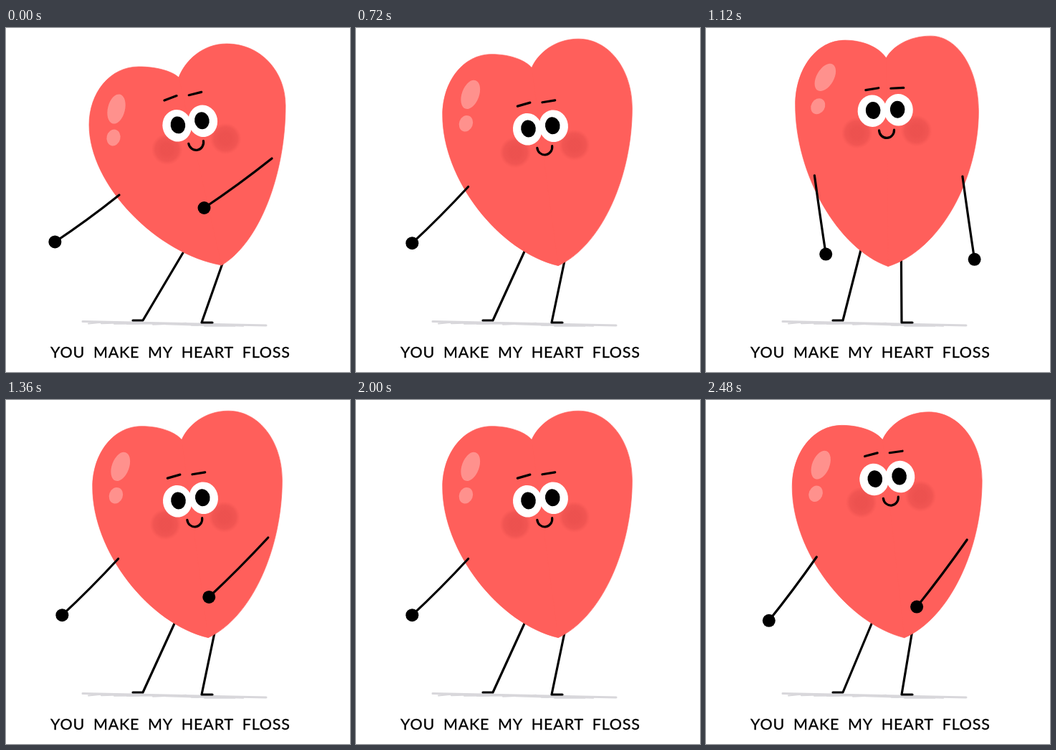
Recreate the animation shown at these times as an HTML page with a canvas. Size 480 by 480 pixels, loop 2560 ms.

```html
<!DOCTYPE html>
<html lang="en">
<head>
<meta charset="utf-8">
<title>You make my heart floss</title>
<style>
  html, body { margin: 0; width: 100%; height: 100%; overflow: hidden; background: #fff; }
  canvas { display: block; width: 480px; height: 480px; }
</style>
</head>
<body>
<canvas id="stage" width="480" height="480"></canvas>
<script>
const ctx = document.getElementById('stage').getContext('2d');
const STEP = 80, STEPS = 32, BEAT = 8;
const INK = '#000', RED = '#ff5f5b', SHINE = '#ff918d', SHADOW = '#d8d7db';

// lean runs from 1 (hands left) to -1 (hands right); rise peaks between the two
function motionAt(phase) {
  const turn = 2 * Math.PI * phase / BEAT;
  const inertia = Math.sin(turn);
  const lean = Math.abs(phase - BEAT / 2) / 2 - 1 + 0.09 * inertia;
  return { lean, inertia, rise: inertia ** 2, bounce: Math.sin(2 * turn) };
}

const place = ({ lean, rise }, rest, sway, lift = [0, 0]) =>
  rest.map((v, i) => v + sway[i] * lean + lift[i] * rise);

function line(points, width = 3.2, color = INK) {
  ctx.beginPath();
  points.forEach(([x, y]) => ctx.lineTo(x, y));
  ctx.lineWidth = width;
  ctx.strokeStyle = color;
  ctx.stroke();
}

function oval(x, y, rx, ry, color, angle = 0) {
  ctx.beginPath();
  ctx.ellipse(x, y, rx, ry, angle, 0, 7);
  ctx.fillStyle = color;
  ctx.fill();
}

function seededRandom(seed) {
  return () => (seed = seed * 16807 % 2147483647) / 2147483647;
}

function drawShadow() {
  const random = seededRandom(7);
  const ground = x => 409.5 + 0.021 * (x - 107);
  line([[107, ground(107)], [363, ground(363)]], 3, SHADOW);
  for (let x = 115; x < 310; x += 18) {
    const end = x + 25 + 30 * random();
    line([[x, ground(x) + 3 * random()], [end, ground(end) + 3 * random() - 1]], 2, SHADOW);
  }
}

function drawLegs(tipX) {
  const shift = tipX - 215;
  line([[tipX - 27 - 0.22 * shift, 300], [191, 408], [177, 408]]);
  line([[tipX + 24 - 0.15 * shift, 300], [273, 411], [288, 411]]);
}

// Half of the heart, from the notch over the lobe to the tip; dir is 1 for the right half
function addHalf(notch, top, side, tip, dir, lean) {
  const [nx, ny] = notch, [tx, ty] = top, [sx, sy] = side;
  const u = dir * lean;
  ctx.moveTo(nx, ny);
  ctx.bezierCurveTo(nx + 0.13 * (tx - nx), (ny + ty) / 2, (nx + tx) / 2, ty, tx, ty);
  ctx.bezierCurveTo(tx + 0.58 * (sx - tx), ty, sx, sy - 0.55 * (sy - ty), sx, sy);
  ctx.bezierCurveTo(sx, sy + 0.43 * (tip[1] - sy),
    tip[0] + dir * (72 - 19 * u), tip[1] - 24 - 8 * u, ...tip);
  ctx.lineTo(nx, ny);
}

function drawHeart(m, tip) {
  const notch = place(m, [250.5, 69], [-9.5, 0], [0, -27]);
  const topL = place(m, [187.5, 44], [-2.5, 10], [6, -26]);
  const topR = place(m, [313, 34.5], [-5, -12.5], [0, -24.5]);
  const sideL = place(m, [112, 132.5], [4, 2.5], [13, -25]);
  const sideR = place(m, [388.5, 110], [1.5, -2], [-8, 6]);
  ctx.beginPath();
  addHalf(notch, topL, sideL, tip, -1, m.lean);
  addHalf(notch, topR, sideR, tip, 1, m.lean);
  ctx.fillStyle = ctx.strokeStyle = RED;
  ctx.lineWidth = 0.7;
  ctx.fill();
  ctx.stroke();

  const angle = 0.5 - 0.26 * m.lean;
  oval(...place(m, [158, 95.5], [-4, 17.5], [8, -25]), 12, 21, SHINE, angle);
  oval(...place(m, [147.5, 133], [2.5, 20], [9, -22]), 9.5, 11.5, SHINE, angle);
}

function drawBlush(x, y) {
  const glow = ctx.createRadialGradient(x, y, 8, x, y, 22);
  glow.addColorStop(0, 'rgba(232, 78, 76, .8)');
  glow.addColorStop(0.6, 'rgba(234, 80, 78, .65)');
  glow.addColorStop(1, 'rgba(240, 84, 80, 0)');
  oval(x, y, 22, 22, glow);
}

function drawFace({ lean, inertia, rise, bounce }) {
  const turn = 1 + 2.5 * lean;
  const browY = -39.5 + 9 * rise;
  ctx.save();
  ctx.translate(253.5 + 3.25 * lean + 3 * inertia, 133 - 18 * rise + 15 * bounce);
  ctx.rotate(-0.05 - 0.13 * lean);
  for (const side of [-1, 1]) {
    drawBlush(41.5 * side + turn, 30);
    const browX = 17.5 * side - 3 * lean;
    const slope = 9 * (0.06 * side - 0.07 - 0.05 * lean);
    line([[browX - 9, browY - slope], [browX + 9, browY + slope]]);
  }
  for (const side of [-1, 1]) oval(18.3 * side, 0, 20.3, 22.3, '#fff');
  for (const side of [-1, 1]) oval(17 * side, -0.7, 10.3, 12, INK);
  ctx.beginPath();
  ctx.ellipse(turn, 27.5, 10.5, 11, 0, 0, Math.PI);
  ctx.stroke();
  ctx.restore();
}

function drawArm([x, y], length, lean) {
  const angle = 0.94 * lean * (1.7 - 0.7 * lean ** 2);
  const handX = x - length * Math.sin(angle);
  const handY = y + length * Math.cos(angle);
  ctx.beginPath();
  ctx.moveTo(x, y);
  ctx.quadraticCurveTo((x + handX) / 2, (y + handY) / 2 + 3, handX, handY);
  ctx.lineWidth = 3.2;
  ctx.strokeStyle = INK;
  ctx.stroke();
  oval(handX, handY, 9, 9, INK);
}

function drawCaption() {
  ctx.font = '21.5px Lato, sans-serif';
  ctx.letterSpacing = '0.8px';
  ctx.wordSpacing = '5.5px';
  ctx.textAlign = 'center';
  ctx.fillStyle = ctx.strokeStyle = INK;
  ctx.lineWidth = 0.35;
  ctx.fillText('YOU MAKE MY HEART FLOSS', 229.4, 459.5);
  ctx.strokeText('YOU MAKE MY HEART FLOSS', 229.4, 459.5);
}

function draw(step) {
  const m = motionAt(step % BEAT);
  const tip = place(m, [258, 332.5], [43, -1.5]);
  const cycle = step % (2 * BEAT);
  const rightBehind = cycle > 4 && cycle < 12;
  const leftArm = () => drawArm(place(m, [140, 213.5], [18, 19.5], [13, -6]), 111, m.lean);
  const rightArm = () => drawArm(place(m, [359, 205], [12, -23]), 117, m.lean);

  ctx.fillStyle = '#fff';
  ctx.fillRect(0, 0, 480, 480);
  ctx.lineCap = ctx.lineJoin = 'round';
  drawShadow();
  drawLegs(tip[0]);
  if (rightBehind) rightArm();
  drawHeart(m, tip);
  drawFace(m);
  leftArm();
  if (!rightBehind) rightArm();
  drawCaption();
}

let start;
function tick(now) {
  start ??= now;
  draw(Math.floor((now - start) / STEP) % STEPS);
  requestAnimationFrame(tick);
}
requestAnimationFrame(tick);
</script>
</body>
</html>
```
